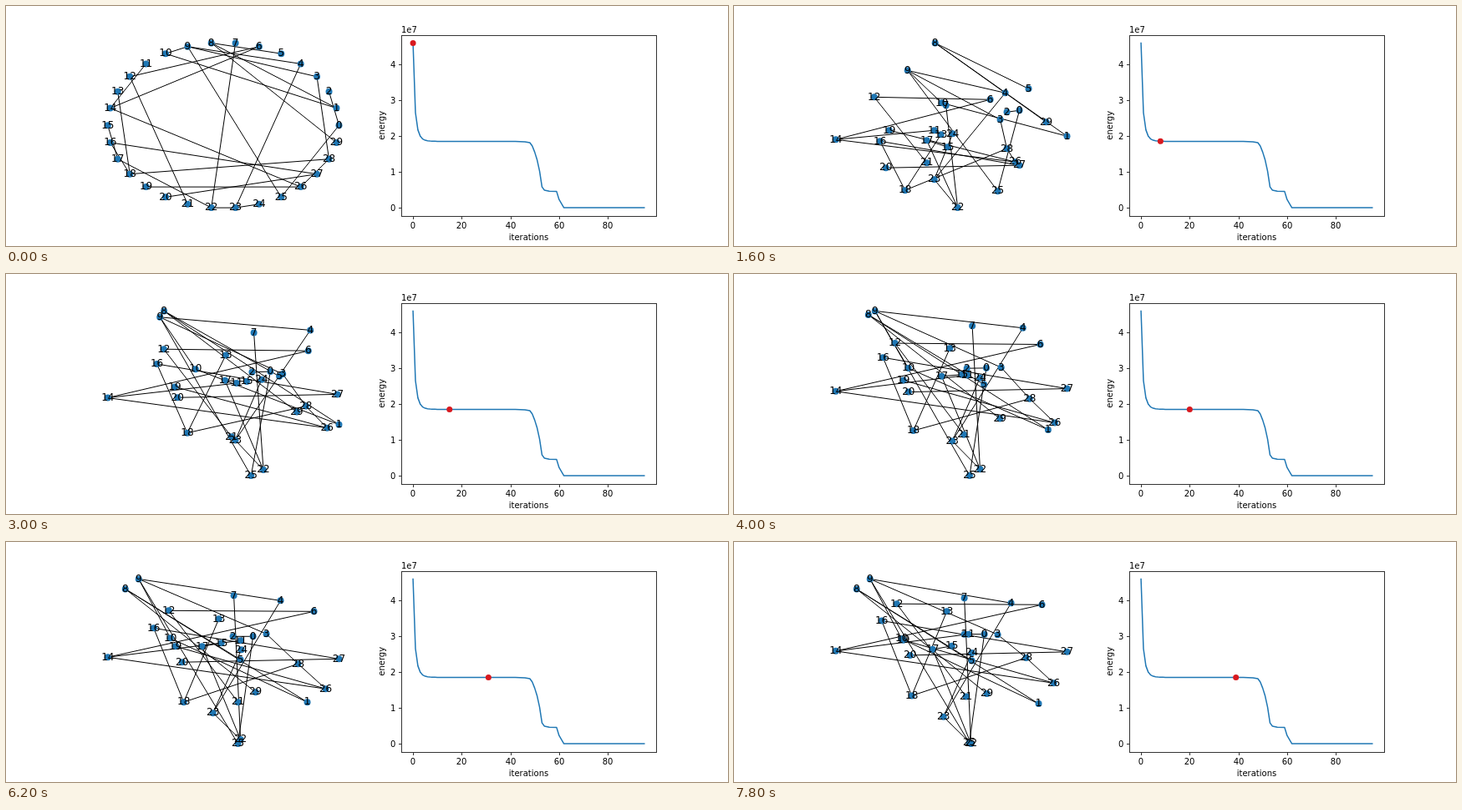
An HTML page that plays this animation: 864x288 px, repeating every 8 s.

```html
<!DOCTYPE html>
<html lang="en">
<head>
<meta charset="utf-8">
<title>Graph layout and energy</title>
<style>
  html, body { margin: 0; width: 100%; height: 100%; overflow: hidden; background: #fff; }
  svg { display: block; width: 864px; height: 288px; font: 10px "DejaVu Sans", sans-serif; }
  .edge { stroke: #000; stroke-width: 1; }
  .node { fill: #1f77b4; }
  .label { font-size: 12px; text-anchor: middle; }
  .axis { stroke: #333; stroke-width: 1; fill: none; shape-rendering: crispEdges; }
  .curve { stroke: #1f77b4; stroke-width: 1.5; fill: none; stroke-linejoin: round; stroke-linecap: square; }
  .marker { fill: #d8191f; }
</style>
</head>
<body>
<svg id="stage" viewBox="0 0 864 288" xmlns="http://www.w3.org/2000/svg"></svg>
<script>
const STEP_MS = 200, STEPS = 40, COUNT = 30;
const SPREAD_AT = 8, REST_AT = 31;
const BOX = [[121.8, 398.5], [44.4, 242.1]];

const stage = document.getElementById('stage');
function set(el, attrs) {
  for (const key in attrs) el.setAttribute(key, attrs[key]);
}
function add(tag, attrs, text) {
  const el = document.createElementNS(stage.namespaceURI, tag);
  set(el, attrs);
  if (text !== undefined) el.textContent = text;
  return stage.appendChild(el);
}
const range = (n, make) => Array.from({ length: n }, (_, i) => make(i));

// Energy plot: a fast decay to a plateau, then two drops
const plotX = iteration => 487.07 + iteration * 2.9126;
const plotY = energy => 242.1 - energy * 43.05;
const plateau = i => 1.85 + 2.742 * Math.exp(-1.231 * i ** 0.8);
const drops = [
  [46, 1.835], [48, 1.815], [49, 1.72], [50, 1.55], [51, 1.33], [52, 1.02], [53, 0.58],
  [54, 0.49], [56, 0.46], [59, 0.453], [60, 0.23], [62, 0], [95, 0]
];
const curve = [...range(43, i => [i, plateau(i)]), ...drops];

add('polyline', { class: 'curve', points: curve.map(([i, e]) => [plotX(i), plotY(e)]).join(' ') });
add('rect', { class: 'axis', x: 473.5, y: 35.5, width: 305, height: 217 });
for (let i = 0; i <= 80; i += 20) {
  const x = Math.round(plotX(i));
  add('path', { class: 'axis', d: `M${x + 0.5} 253v3` });
  add('text', { x, y: 267, 'text-anchor': 'middle' }, i);
}
for (let e = 0; e <= 4; e++) {
  const y = Math.round(plotY(e));
  add('path', { class: 'axis', d: `M470 ${y + 0.5}h3` });
  add('text', { x: 466.4, y: y + 4, 'text-anchor': 'end' }, e);
}
add('text', { x: 473, y: 32 }, '1e7');
add('text', { x: 625.5, y: 281, 'text-anchor': 'middle' }, 'iterations');
add('text', { transform: 'translate(453 143.3) rotate(-90)', 'text-anchor': 'middle' }, 'energy');
const marker = add('circle', { class: 'marker', r: 3.5 });

// Graph layout: a circle collapses, then unfolds towards its rest shape
const circle = range(COUNT, i => {
  const angle = i * 2 * Math.PI / COUNT;
  return [Math.cos(angle), -Math.sin(angle)];
}).map(([x, y]) => [260 + 138 * x, 143 + 99 * y]);
const pairs = (...v) => range(COUNT, i => v.slice(2 * i, 2 * i + 2));
const spread = pairs(
  342, 125, 399, 156, 327, 127, 319, 136, 325, 104, 353, 99, 307, 112, 254, 119, 241, 44, 208, 77,
  249, 116, 240, 149, 168, 109, 248, 154, 122, 160, 256, 169, 175, 162, 231, 161, 205, 221, 186, 149,
  182, 194, 231, 188, 268, 242, 240, 208, 262, 153, 316, 222, 337, 187, 342, 191, 327, 171, 374, 139);
const rest = pairs(
  296, 113, 361, 192, 272, 113, 312, 110, 329, 70, 281, 141, 369, 83, 273, 64, 143, 56, 159, 44,
  197, 115, 281, 118, 195, 82, 255, 92, 122, 138, 258, 121, 177, 103, 235, 125, 213, 192, 203, 125,
  211, 144, 278, 192, 281, 237, 248, 205, 282, 129, 278, 242, 383, 176, 399, 140, 350, 146, 299, 180);

// Branches swing out while unfolding and drift slowly once at rest
const branches = [
  { nodes: [1, 3, 5, 8, 9, 10, 29], swing: [0, 0], drift: [4, 1.5] },
  { nodes: [0, 2, 25], swing: [-14, 0], drift: [4, -2] },
  { nodes: [4, 7, 15, 17, 22, 23, 24], swing: [18, -12], drift: [3, 4] },
  { nodes: [13, 16, 18, 20, 27], swing: [0, -18], drift: [0, -8] },
  { nodes: [6, 11, 12, 14, 19, 21, 26, 28], swing: [0, 0], drift: [0, -7] }
];
const branchOf = range(COUNT, i => branches.find(b => b.nodes.includes(i)));

const phase = (t, from, to) => Math.min(1, Math.max(0, (t - from) / (to - from)));
const easeOut = (u, power) => 1 - (1 - u) ** power;
const bump = u => 9.75 * u * (1 - u) ** 3;

// Scale values so that they fill the given range
function fit(values, [low, high]) {
  const min = Math.min(...values), max = Math.max(...values);
  return values.map(v => low + (v - min) * (high - low) / (max - min));
}
function layout(iteration) {
  const collapse = easeOut(phase(iteration, 0, SPREAD_AT), 3);
  const u = phase(iteration, SPREAD_AT, REST_AT);
  const unfold = easeOut(u, 2.4), swing = bump(u);
  const drift = phase(iteration, REST_AT, STEPS - 1);
  return BOX.map((bounds, axis) => fit(range(COUNT, i => {
    const a = circle[i][axis], b = spread[i][axis], c = rest[i][axis];
    return a + (b - a) * collapse + (c - b) * unfold
      + branchOf[i].swing[axis] * swing + branchOf[i].drift[axis] * drift;
  }), bounds));
}

const paths = [
  [1, 10, 9, 25, 0, 2], [9, 4, 23, 24], [9, 3, 28, 26, 14, 6, 12, 21], [1, 8, 5], [8, 29],
  [7, 22, 23], [15, 17, 22], [11, 14], [13, 18, 28], [18, 16, 27, 20], [19, 26]
];
const edges = paths.flatMap(path => path.slice(1).map((b, k) =>
  ({ a: path[k], b, line: add('line', { class: 'edge' }) })));
const dots = range(COUNT, () => add('circle', { class: 'node', r: 4 }));
const labels = range(COUNT, i => add('text', { class: 'label' }, i));

let shown = -1;
function draw() {
  const step = Math.floor(performance.now() / STEP_MS) % STEPS;
  if (step !== shown) {
    shown = step;
    const [x, y] = layout(step);
    edges.forEach(({ a, b, line }) => set(line, { x1: x[a], y1: y[a], x2: x[b], y2: y[b] }));
    dots.forEach((dot, i) => set(dot, { cx: x[i], cy: y[i] }));
    labels.forEach((label, i) => set(label, { x: x[i], y: Math.round(y[i] + 3.3) }));
    set(marker, { cx: plotX(step), cy: plotY(plateau(step)) });
  }
  requestAnimationFrame(draw);
}
draw();
</script>
</body>
</html>
```
